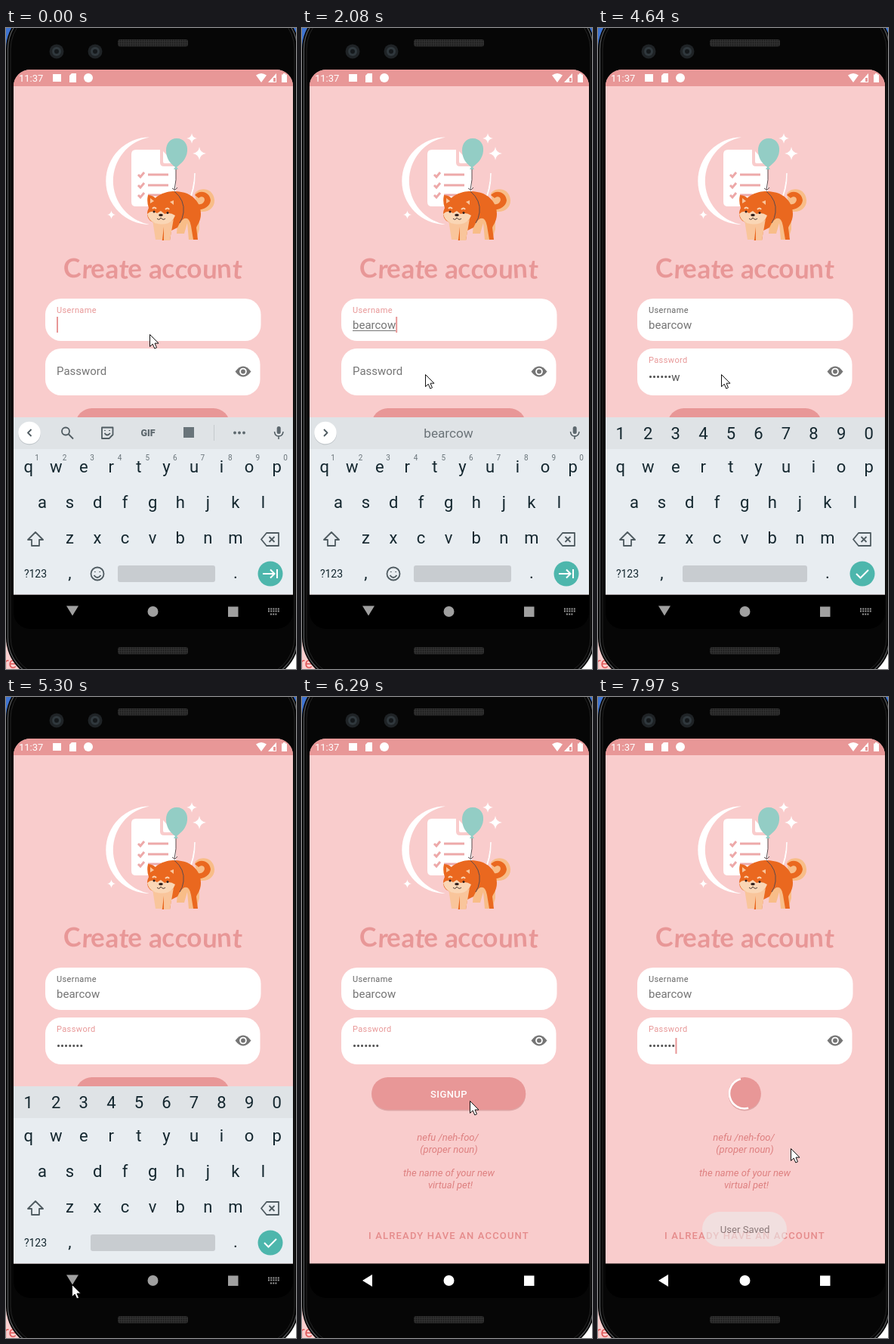
These frames come from a looping animation (384x848 px, 7990 ms). An HTML page:

```html
<!DOCTYPE html>
<html lang="en">
<head>
<meta charset="utf-8">
<title>Create account</title>
<style>
  html, body { margin: 0; width: 100%; height: 100%; overflow: hidden; background: #fff; }
  svg { display: block; width: 100%; height: 100%; font-family: Roboto, sans-serif; }
  .mid { text-anchor: middle; }
  .title { font: 700 35px Lato, sans-serif; fill: #e89797; }
  .input { font-size: 15px; fill: #757575; }
  .label { font-size: 11px; letter-spacing: .38px; }
  .note { font-size: 13px; font-style: italic; fill: #de8080; text-anchor: middle; }
  .keys { font-size: 22px; fill: #14272f; text-anchor: middle; }
  .hint { font-size: 10px; fill: #69747a; text-anchor: middle; }
  .word { font-size: 17.2px; fill: #6b7378; text-anchor: middle; }
  .line { fill: none; stroke: #4f5b61; stroke-width: 1.8; stroke-linejoin: round; }
</style>
</head>
<body>
<svg id="stage" viewBox="0 0 384 848" preserveAspectRatio="none">
  <defs>
    <clipPath id="screen"><rect x="10" y="55" width="370" height="740" rx="22"/></clipPath>
    <pattern id="mesh" width="3" height="3" patternUnits="userSpaceOnUse">
      <rect width="3" height="3" fill="#303030"/><circle cx="1.5" cy="1.5" r=".9" fill="#1a1a1a"/>
    </pattern>
    <path id="spark" d="M0-8Q1-1 8 0Q1 1 0 8Q-1 1-8 0Q-1-1 0-8" fill="#fff"/>
    <g id="lens"><circle r="9.5" fill="#1f2326"/><circle r="6" fill="#30383d"/><circle r="3" fill="#15191c"/></g>
  </defs>

  <!-- desktop and phone body -->
  <rect width="384" height="60" fill="#3f74d1"/>
  <path d="M0 800H20V848H0Z" fill="#fbd0d0"/>
  <text x="-3" y="847" font-size="20" fill="#e05a5a">re</text>
  <rect y="-30" width="388" height="894" rx="58" fill="#060606"/>
  <rect x="2.500" y="-27.500" width="383" height="889" rx="55.500" fill="none" stroke="#5a5c5e" stroke-width="1.200"/>
  <rect x="6" y="-24" width="376" height="882" rx="52" fill="none" stroke="#242424"/>
  <use href="#lens" x="67" y="31"/><use href="#lens" x="118" y="31"/>
  <rect x="148" y="15" width="93" height="9.5" rx="3" fill="url(#mesh)"/>
  <rect x="148" y="819" width="93" height="9.5" rx="3" fill="url(#mesh)"/>

  <g clip-path="url(#screen)">
    <rect x="10" y="55" width="370" height="695" fill="#f9cccc"/>
    <rect x="10" y="55" width="370" height="22" fill="#e89797"/>
    <g fill="#fff">
      <text x="17" y="71" font-size="13">11:37</text>
      <rect x="62" y="61" width="11" height="10"/>
      <path d="M87 60H93V72H84V63Z"/>
      <circle cx="109" cy="66" r="6"/>
      <path d="M331 62.5Q338 57.5 345 62.5L338 72ZM358 60V72H347ZM365 61.5H367V60H370V61.5H372V72H365Z"/>
    </g>
    <path d="M354 66H357V71H354Z" fill="#e89797"/>

    <!-- illustration -->
    <g fill="#fff">
      <path d="M190 144.500A57.600 57.600 0 0 0 190 260A58.700 58.700 0 0 1 190 144.500"/>
      <path d="M250 192Q251 213 241 232Q249 213 250 192" stroke="#fff"/>
      <path d="M172 161H204V178Q204 183 209 183H225V230Q225 236 218 236H172Q166 236 166 230V167Q166 161 172 161ZM208 163L223 179H210Q208 179 208 177Z"/>
      <use href="#spark" transform="translate(246 146) scale(.85)"/>
      <use href="#spark" transform="translate(256 166) scale(1.1)"/>
      <use href="#spark" transform="translate(139.500 247) scale(.7)"/>
    </g>
    <path d="M175 194L178 197L183 191M175 208L178 211L183 205M175 221L178 224L183 218M188 194H215M188 208H215M188 221H205" fill="none" stroke="#eda9a9" stroke-width="3"/>
    <path d="M226 146C236 146 241 154 240 163C239 174 231 180 226 184L228 187H222L224 184C217 179 212 172 212 162C212 153 217 146 226 146" fill="#93cdc5"/>

    <!-- dog: tail, far legs, body, near legs, head -->
    <path d="M250 219C256 210 274 211 276 227C277 238 266 246 254 242Z" fill="#f8bd88"/>
    <path d="M250 240C260 242 270 237 271 228C270 217 257 213 250 221L255 225C260 221 265 225 262 230C259 235 254 233 250 232Z" fill="#ea681f"/>
    <path d="M228 246L226 272H236L240 258L242 280H252L256 266V242Z" fill="#f8bd88"/>
    <path d="M190 236C198 217 219 214 232 217C247 219 258 231 258 246C258 255 254 259 252 264L254 280H248L245 262Q243 250 236 252Q230 256 227 264L219 268L217 281H207L196 260Z" fill="#ea681f"/>
    <path d="M194 254L198 280H207L209 263L209 281H217L222 252Z" fill="#f9c59b"/>
    <path d="M188 221Q195 221 200 227Q208 224 214 228Q219 224 225 225Q227 233 224 240Q228 248 221 254Q206 263 191 255Q184 248 189 238Q186 230 188 221" fill="#ea681f"/>
    <path d="M191 225L196 229L191 232ZM222 228L217 230L222 234Z" fill="#f9c59b"/>
    <path d="M187 246Q193 240 200 245L205 242L210 246Q217 243 224 248Q220 260 205 259.500Q190 259 187 246" fill="#fad6b5"/>
    <path d="M194 239Q196 236 199 239M211 240Q214 237 216 240" fill="none" stroke="#fad6b5" stroke-width="2"/>
    <g fill="#33221f"><circle cx="196" cy="243" r="1.500"/><circle cx="214" cy="244.500" r="1.500"/><ellipse cx="205" cy="247.500" rx="2.800" ry="1.800"/></g>
    <path d="M200 252Q203 255 205 251Q208 255 211 252" fill="none" stroke="#33221f" stroke-width=".9"/>
    <path d="M225 187Q226 201 223 214L220 212M223 215L227 211M223 216Q237 228 235 244Q234 252 230 258" fill="none" stroke="#5b4a4d"/>

    <text class="title mid" x="194.500" y="331" rotate="-4 3 -3 2 4 -3 0 3 -3 2 -3 2 -3 4">Create account</text>

    <!-- form -->
    <rect x="52" y="358" width="285.500" height="56" rx="21" fill="#fff"/>
    <rect x="52" y="424" width="284.500" height="62" rx="21" fill="#fff"/>
    <text id="nameLabel" class="label" x="67" y="377">Username</text>
    <text id="name" class="input" x="67" y="398"></text>
    <rect id="underline" x="67" y="400" height="1" fill="#757575"/>
    <text id="passLabel" x="67">Password</text>
    <text id="pass" class="input" x="67" y="467" style="fill:#555"></text>
    <rect id="caret" width="2" height="21" fill="#e89797"/>
    <path d="M303.500 454.500Q314 440.500 324.500 454.500Q314 468.500 303.500 454.500" fill="#757575"/>
    <circle cx="314" cy="454.500" r="3.900" fill="#757575" stroke="#fff" stroke-width="1.900"/>

    <rect id="shadow" y="504.500" height="43" rx="21.500" fill="#b56b6b" opacity=".4"/>
    <rect id="button" y="503" height="43" rx="21.500" fill="#e89797"/>
    <text id="signup" class="mid" x="194.500" y="529.500" font-size="13" font-weight="500" letter-spacing=".4" fill="#fff">SIGNUP</text>
    <circle id="spinner" cx="194" cy="524.500" r="20" fill="none" stroke="#fff" stroke-width="2.600" pathLength="360"/>

    <text class="note" x="193" y="587">nefu /neh-foo/</text>
    <text class="note" x="194.500" y="603">(proper noun)</text>
    <text class="note" x="194.500" y="634">the name of your new</text>
    <text class="note" x="196.500" y="650">virtual pet!</text>
    <text x="88" y="717" font-size="13" font-weight="500" letter-spacing="1.170" fill="#e58b8b">I ALREADY HAVE AN ACCOUNT</text>

    <g id="toast">
      <rect x="138" y="681" width="112" height="46" rx="23" fill="#ececec"/>
      <text class="mid" x="194.500" y="709" font-size="13.200" fill="#444">User Saved</text>
    </g>

    <rect x="10" y="749.500" width="370" height="46" fill="#000"/>
    <g id="keyboard"></g>

    <!-- navigation bar -->
    <rect id="ripple" y="750" height="45" rx="22.500" fill="#fff"/>
    <g id="nav">
      <path id="back" d="M-8-6.500H8L0 6.500Z"/>
      <circle cx="194.500" cy="772" r="7"/>
      <rect x="294" y="765.500" width="13.500" height="13.500"/>
    </g>
    <path id="switcher" d="M347 768.500H362M347 771.500H362M350 775.500H359" stroke="#999" stroke-width="1.800" stroke-dasharray="2 1.200"/>
  </g>

  <path id="mouse" d="M0 0V16L3.700 12.600L6.300 18.500L9 17.300L6.500 11.600H11.500Z" fill="#fff" stroke="#111" stroke-linejoin="round"/>
</svg>

<script>
const LOOP = 7990;
const $ = id => document.getElementById(id);
const set = (id, attrs) => { for (const k in attrs) $(id).setAttribute(k, attrs[k]); };
const show = (id, on) => { $(id).style.display = on ? "" : "none"; };
const clamp = v => Math.min(1, Math.max(0, v));
const part = (t, from, to) => clamp((t - from) / (to - from));
const smooth = p => p * p * (3 - 2 * p);
const mix = (a, b, p) => a + (b - a) * p;
const latest = (steps, t) => steps.reduce((value, [at, next]) => t >= at ? next : value, "");

function row(chars, x, y, cls = "keys") {
  return [...chars].map((c, i) => `<text class="${cls}" x="${x + 36.55 * i}" y="${y}">${c}</text>`).join("");
}

$("keyboard").innerHTML = `
  <rect x="10" y="515" width="370" height="234.500" fill="#e8edf1"/>
  <rect x="10" y="515" width="370" height="42" fill="#dfe3e6"/>
  ${row("qwertyuiop", 29.7, 588)}${row("asdfghjkl", 48, 635)}${row("zxcvbnm", 84.5, 682)}
  <text class="keys" x="39" y="727" style="font-size:14px">?123</text>
  <text class="keys" x="84.5" y="728">,</text><text class="keys" x="304" y="728">.</text>
  <path class="line" d="M39 667L49 677H44V685H34V677H29ZM345 668H361V685H345L338 676.500ZM348.500 673L355.500 680M355.500 673L348.500 680"/>
  <rect id="space" y="711" height="22" rx="3" fill="#c8ccd0"/>
  <circle cx="350" cy="722" r="16.500" fill="#4db6ac"/>
  <path id="enter" fill="none" stroke="#fff" stroke-width="2"/>
  <g id="textMode">
    ${row("1234567890", 41, 572, "hint")}
    <g class="line"><circle cx="121" cy="722" r="8.500"/><path d="M116.500 724Q121 730 125.500 724M117.800 719V720M124.200 719V720"/></g>
    <circle cx="31" cy="536.500" r="15" fill="#bfc5c9"/><circle cx="31" cy="535.500" r="14.800" fill="#fff"/>
    <path id="chevron" class="line"/>
    <rect x="358.700" y="527" width="5" height="10" rx="2.500" fill="#5d686e"/>
    <path class="line" style="stroke-width:1.500" d="M355.500 534Q356 540 361 540Q366.500 540 367 534M361 540V544"/>
    <g id="tools">
      <g class="line"><circle cx="79" cy="533.500" r="5"/><path d="M83 537.500L89 543.500"/>
      <path d="M127 528.500H141.500V538L136.500 543H127ZM130.500 536Q134 541 138 536M131 532V533M137 532V533"/></g>
      <text x="188" y="539.500" class="mid" font-size="12.500" font-weight="900" fill="#5d686e">GIF</text>
      <rect x="235" y="528" width="14" height="14" fill="#69747a"/>
      <path d="M275.500 525V546" stroke="#c5cacd"/>
      <g fill="#5d686e"><circle cx="303" cy="535.500" r="1.900"/><circle cx="309" cy="535.500" r="1.900"/><circle cx="315" cy="535.500" r="1.900"/></g>
    </g>
    <g id="words">
      <path id="dividers" d="M146 526V545M242 526V545" stroke="#c5cacd"/>
      <text id="left" class="word" x="98" y="542">bears</text>
      <text id="typed" class="word" x="194" y="542"></text>
      <text id="right" class="word" x="290" y="542">beard</text>
    </g>
  </g>
  <g id="passMode">${row("1234567890", 29.7, 544)}</g>`;

const nameSteps = [[60, "b"], [110, "be"], [170, "bear"], [1090, "bearc"], [1130, "bearco"], [1170, "bearcow"]];
const passKeys = [[2940, "p"], [3030, "a"], [3180, "s"], [3330, "s"], [3670, "n"], [3750, "e"], [3820, "w"]];
const passSteps = passKeys.map(([at, key], i) => [at, "•".repeat(i) + key]).concat([[5290, "•".repeat(7)]]);
const caretToggles = [600, 1050, 1600, 2080, 2710, 2940, 4310, 4800, 5300, 5790, 6290, 6730, 7250, 7730];
const mousePath = [
  [1630, 190, 405], [2050, 163, 458], [4640, 163, 458], [5280, 87, 777], [5860, 87, 777],
  [6290, 222, 534], [6320, 222, 534], [6410, 221, 534], [7100, 221, 534], [7650, 255, 597]
];

function mouseAt(t) {
  let [, x, y] = mousePath[0];
  for (let i = 1; i < mousePath.length; i++) {
    const p = smooth(part(t, mousePath[i - 1][0], mousePath[i][0]));
    x = mix(x, mousePath[i][1], p);
    y = mix(y, mousePath[i][2], p);
  }
  return [x, y];
}

function drawForm(t) {
  const onPass = t >= 2230;
  const name = latest(nameSteps, t);
  $("name").textContent = name;
  $("pass").textContent = latest(passSteps, t);
  const nameWidth = $("name").getComputedTextLength();
  set("underline", { width: nameWidth });
  show("underline", name && !onPass);
  set("nameLabel", { fill: onPass ? "#666" : "#e89797" });

  const rise = smooth(part(t, 2250, 2420));
  set("passLabel", {
    y: mix(459, 443, rise), "font-size": mix(15, 11, rise), "letter-spacing": mix(0, .38, rise),
    fill: rise > .3 ? "#e89797" : "#757575"
  });

  set("caret", {
    x: 67 + (onPass ? $("pass").getComputedTextLength() : nameWidth),
    y: onPass ? 451 : 382
  });
  show("caret", caretToggles.filter(at => t >= at).length % 2 === 0);
}

function drawKeyboard(t) {
  const name = latest(nameSteps, t);
  const digits = t >= 2310;
  show("textMode", !digits);
  show("passMode", digits);
  show("tools", !name);
  show("words", name);
  for (const id of ["left", "right", "dividers"]) show(id, name.length < 5);
  $("typed").textContent = name;
  set("chevron", { d: name ? "M29 531L33.500 535.500L29 540" : "M33.500 531L29 535.500L33.500 540" });
  set("space", { x: digits ? 112 : 148, width: digits ? 165 : 129 });
  set("enter", { d: digits ? "M342 722L347.500 727.500L358 717" : "M340 722H355M350 716.500L355.500 722L350 727.500M359 716V728" });

  const leave = part(t, 5640, 5895);
  set("keyboard", { transform: `translate(0 ${58 * leave})`, opacity: 1 - leave });
}

function drawNav(t) {
  const turn = smooth(part(t, 5600, 5870));
  set("back", { transform: `translate(${mix(88, 86.5, turn)} ${mix(771, 772, turn)}) rotate(${90 * turn})` });
  set("nav", { fill: t < 5640 ? "#a0a0a0" : "#fff" });
  show("switcher", t < 5640);
  const half = mix(12, 48, smooth(part(t, 5510, 5700)));
  set("ripple", {
    x: 88 - half, width: 2 * half,
    opacity: .08 * part(t, 5510, 5600) * (1 - part(t, 5830, 6150))
  });
}

function drawButton(t) {
  const width = mix(204, 43, smooth(part(t, 6930, 7250)));
  const box = { x: 194.2 - width / 2, width };
  set("button", box);
  set("shadow", box);
  set("signup", { opacity: 1 - part(t, 6900, 6990) });
  show("spinner", t >= 7250);
  const sweep = mix(20, 180, smooth(part(t, 7250, 7970)));
  set("spinner", {
    "stroke-dasharray": `${sweep} 360`,
    transform: `rotate(${75 + (t - 7970) * .2} 194 524.5)`
  });
  set("toast", { opacity: .6 * part(t, 7840, 7970) });
}

function render(t) {
  drawForm(t);
  drawKeyboard(t);
  drawNav(t);
  drawButton(t);
  const [x, y] = mouseAt(t).map(Math.round);
  set("mouse", { transform: `translate(${x + .5} ${y + .5})` });
}

const start = performance.now();
function tick() {
  render((performance.now() - start) % LOOP);
  requestAnimationFrame(tick);
}
tick();
</script>
</body>
</html>
```
